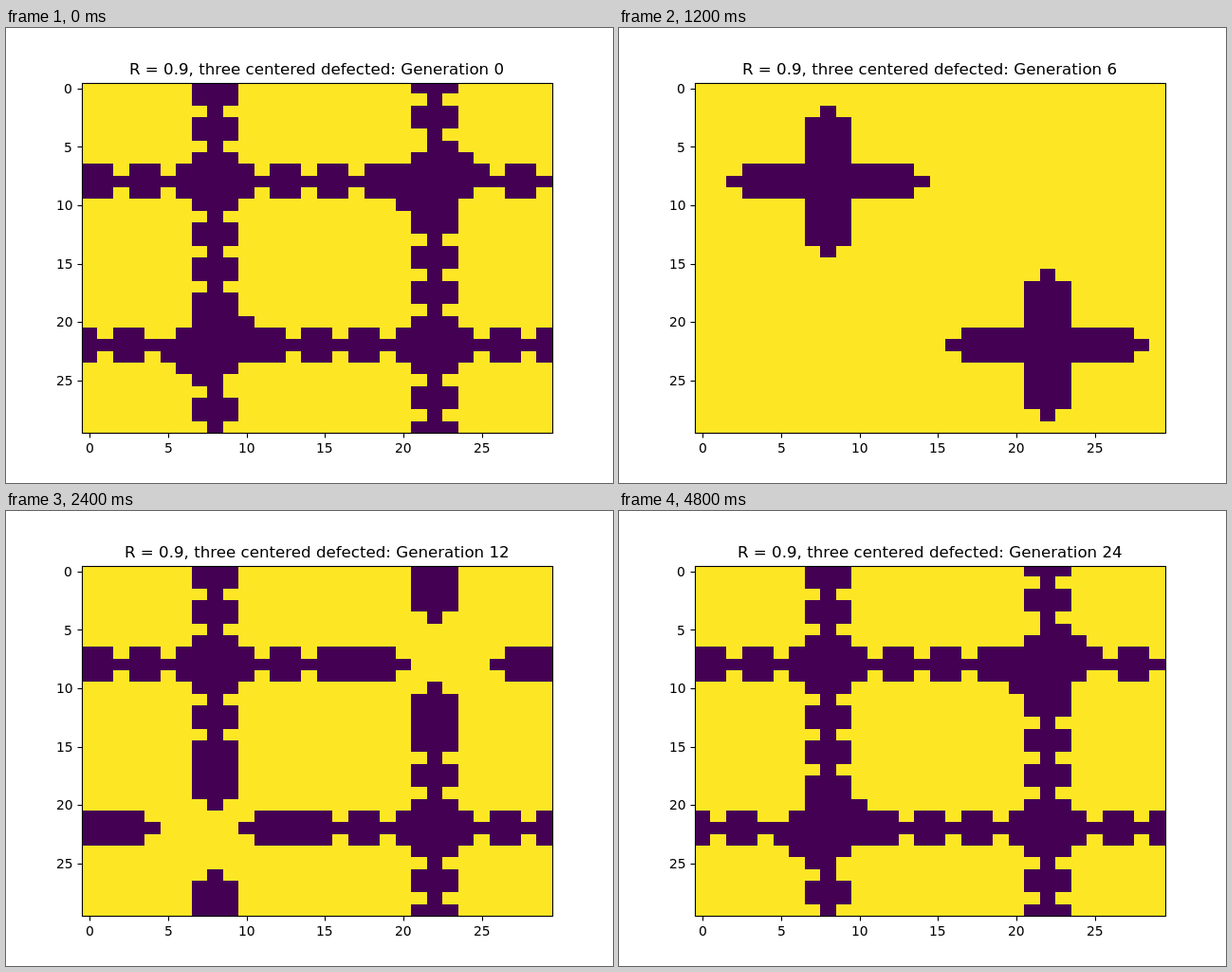
These frames come from a looping animation (640 px wide and 480 px high, 5 s). An HTML page with a canvas:

```html
<!DOCTYPE html>
<html lang="en">
<head>
<meta charset="utf-8">
<title>Spatial game</title>
<style>
html, body { margin: 0; width: 100%; height: 100%; overflow: hidden; background: #fff; }
canvas { display: block; }
</style>
</head>
<body>
<canvas id="stage" width="640" height="480"></canvas>
<script>
const ctx = document.getElementById('stage').getContext('2d');
const N = 30, GENERATIONS = 25, STEP = 200;
const LEFT = 80, TOP = 57.6, CELL_W = 496 / N, CELL_H = 369.6 / N;

// Payoffs of the prisoner's dilemma: reward, temptation, punishment
const R = 0.9, T = 1.6, P = 0.1;

const wrap = i => (i + N) % N;
const hood = Array.from({ length: N * N }, (_, i) => {
  const x = i % N, y = Math.floor(i / N);
  return [[0, 0], [1, 0], [-1, 0], [0, 1], [0, -1]]
    .map(([dx, dy]) => wrap(y + dy) * N + wrap(x + dx));
});

// Every cell copies its best-paid neighbour; 1 means defector.
function evolve(grid) {
  const pay = grid.map((defects, i) => {
    const foes = hood[i].slice(1).reduce((sum, j) => sum + grid[j], 0);
    return defects ? T * (4 - foes) + P * foes : R * (4 - foes);
  });
  return grid.map((_, i) => grid[hood[i].reduce((best, j) => pay[j] > pay[best] + 1e-9 ? j : best)]);
}

const start = Array(N * N).fill(0);
start[8 * N + 8] = start[22 * N + 22] = 1;
const states = [start];
while (states.length < GENERATIONS) states.push(evolve(states[states.length - 1]));
states[0] = states[GENERATIONS - 1];  // the loop opens on the settled grid

const edgeX = k => Math.round(LEFT - 0.05 + k * CELL_W);
const edgeY = k => Math.max(58, Math.round(57 + k * 37 / 3));

function text(str, x, y, size, align) {
  ctx.font = `${size}px "DejaVu Sans", sans-serif`;
  ctx.fillText(str, Math.round(x - ctx.measureText(str).width * align), Math.round(y));
}

function line(x1, y1, x2, y2) {
  ctx.beginPath();
  ctx.moveTo(x1, y1);
  ctx.lineTo(x2, y2);
  ctx.stroke();
}

function draw(gen) {
  ctx.fillStyle = '#fff';
  ctx.fillRect(0, 0, 640, 480);
  ctx.fillStyle = '#fde725';
  ctx.fillRect(LEFT, 58, 496, 369);
  ctx.fillStyle = '#440154';
  states[gen].forEach((defects, i) => {
    if (!defects) return;
    const c = i % N, r = Math.floor(i / N), x = edgeX(c), y = edgeY(r);
    ctx.fillRect(x, y, edgeX(c + 1) - x, edgeY(r + 1) - y);
  });

  ctx.fillStyle = ctx.strokeStyle = '#000';
  ctx.lineWidth = 1.11;
  ctx.strokeRect(80.5, 58.5, 496, 369);
  for (let v = 0; v < N; v += 5) {
    const x = LEFT + (v + 0.5) * CELL_W, y = TOP + (v + 0.5) * CELL_H;
    const tx = Math.round(x) + 0.5, ty = Math.round(y) + 0.5;
    line(tx, 427.5, tx, 432.5);
    line(75.5, ty, 80.5, ty);
    text(v, x, 448, 13.889, 0.5);
    text(v, 70.28, y + 5.2, 13.889, 1);
  }
  text(`R = ${R}, three centered defected: Generation ${gen}`, 328, 49, 16.667, 0.5);
}

function tick(now) {
  draw(Math.floor(now / STEP) % GENERATIONS);
  requestAnimationFrame(tick);
}
tick(0);
</script>
</body>
</html>
```
